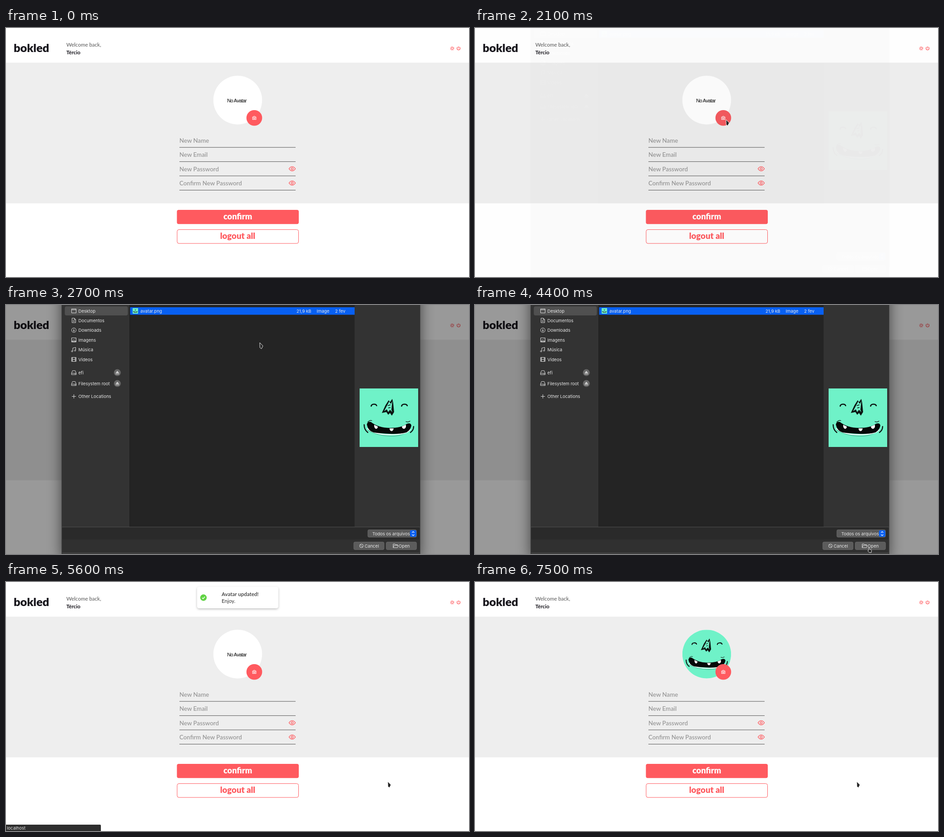
Animation, 1020 px wide and 549 px high, one loop 8000 ms. Source, as an HTML page:

```html
<!DOCTYPE html>
<html lang="en">
<head>
<meta charset="utf-8">
<title>Profile avatar update</title>
<style>
  html, body { margin: 0; width: 100%; height: 100%; overflow: hidden; background: #fff; }
  svg { display: block; width: 100%; height: 100%; }
  .lato { font-family: Lato, sans-serif; }
  .heavy { font-family: Lato, sans-serif; font-weight: 900; }
  .alt { font-family: "Liberation Sans", Arial, sans-serif; letter-spacing: -.6px; }
  .ui { font-family: Inter, sans-serif; font-size: 9.6px; fill: #e8e8e8; }
  .line { fill: none; stroke: #ff5a5f; stroke-width: 1.3; }
  .glyph { fill: none; stroke: #ddd; stroke-width: 1; }
  .unstyled text { visibility: hidden; }
</style>
</head>
<body>
<svg id="stage" viewBox="0 0 1020 549">
  <defs>
    <clipPath id="round"><circle cx="510.5" cy="159" r="53.7"/></clipPath>
    <filter id="soft" x="-20%" y="-20%" width="140%" height="140%"><feGaussianBlur stdDeviation="15"/></filter>
    <filter id="lift" x="-10%" y="-30%" width="120%" height="180%">
      <feDropShadow dx="0" dy="2" stdDeviation="2.5" flood-opacity=".25"/>
    </filter>
    <g id="eye">
      <path class="line" d="M-7 0Q-3.8-4.7 0-4.7T7 0Q3.8 4.7 0 4.7T-7 0Z"/>
      <circle class="line" r="2.3"/>
    </g>
    <g id="drive" class="glyph"><path d="M-5.2 1.5 -3-4.2H3L5.2 1.5V4.6H-5.2ZM-5.2 1.5H5.2M2 3H3.6"/></g>
    <g id="eject">
      <circle r="7.6" fill="#686868"/>
      <path d="M-4 1 0-3.6 4 1ZM-4 2.2H4V3.4H-4Z" fill="#ddd"/>
    </g>
    <g id="face">
      <rect width="129" height="129" fill="#6ff2c8"/>
      <path d="M18 92Q40 104 66 105T104 95" fill="none" stroke="#54c8a4" stroke-width="2"/>
      <g fill="none" stroke="#0c1512" stroke-linecap="round">
        <path d="M25.5 39C26 34 36 33 37.5 38M92.500 39C93 34 103 33 105 38" stroke-width="2.6"/>
        <path d="M10 80Q10 91 18 97M119 84Q119 92 112 97" stroke-width="2.4"/>
        <path d="M18 74Q23 69 27 71M102 73Q107 75 111 72" stroke-width="1.2"/>
      </g>
      <path d="M49 54 57 37 64 26 67 30 72 23 74 32 76 52 71 60 67 54 63 58 59 52Z" fill="#0c1512"/>
      <path d="M54 50 65 29 69 34 72 28 70 47 72 52 67 47 63 52 60 46Z" fill="#6ff2c8"/>
      <path d="M62 38 68 36M63 43 68 42" stroke="#0c1512" stroke-width="1.4"/>
      <path d="M17 88Q32 102 68 102T112 90" fill="none" stroke="#fff" stroke-width="2"/>
      <path d="M16 79Q18 72 25 74Q42 87 67 87T104 78Q113 75 114 82Q112 92 103 97Q87 101 66 100T31 97Q18 93 16 79Z" fill="#050908"/>
      <path d="M32 80 40 84Q40 89 36 89Q32 88 32 80ZM66 88H75Q74 94 70 94Q66 93 66 88ZM93 84 102 80Q103 88 98 89Q94 89 93 84Z" fill="#fff"/>
    </g>
  </defs>
  <rect width="1020" height="549" fill="#fff"/>
  <g id="page"></g>
  <g id="toast"></g>
  <rect id="dim" width="1020" height="549" opacity="0"/>
  <g id="dialog" opacity="0"></g>
  <g id="status"></g>
  <g id="cursor" fill="#252525" stroke="#fff" stroke-width=".9" stroke-linejoin="round">
    <path id="arrow" d="M0 0 7 7.200 3.800 13.500 .3 11Z"/>
    <path id="hand" d="M0 7V1.300a1.100 1.100 0 0 1 2.200 0V4.800L5.600 5.600Q7 6 6.700 7.600L6 11.800H1.500L-1.700 8.200Q-1.400 6.800 0 7Z"/>
  </g>
</svg>
<script>
const LOOP = 8000, STEP = 100;
const RED = '#ff5a5f';
const $ = id => document.getElementById(id);

const text = (x, y, size, fill, cls, str, extra = '') =>
  `<text x="${x}" y="${y}" font-size="${size}" fill="${fill}" class="${cls}" ${extra}>${str}</text>`;
const label = (x, y, str) => `<text x="${x}" y="${y + 3.5}" class="ui">${str}</text>`;
const box = (x, y, w, h, fill, r = 0, extra = '') =>
  `<rect x="${x}" y="${y}" width="${w}" height="${h}" rx="${r}" fill="${fill}" ${extra}/>`;
const use = (id, x, y, scale = 1) =>
  `<use href="#${id}" transform="translate(${x} ${y}) scale(${scale})"/>`;

function buildPage() {
  const fields = ['New Name', 'New Email', 'New Password', 'Confirm New Password'].map((name, i) => {
    const y = 263.2 + i * 31.43;
    return text(382, y - 10.5, 13.3, '#999', 'lato', name, 'font-weight="600"') +
      box(382, y - .5, 256, 1, '#555') + (i > 1 ? use('eye', 630.5, y - 15.7) : '');
  }).join('');
  const middle = 'text-anchor="middle"';
  $('page').innerHTML =
    text(17, 52.5, 25.3, '#15131a', 'heavy', 'bokled') +
    text(133, 41, 11.5, '#555', 'lato', 'Welcome back,') +
    text(133, 58, 11.5, '#15131a', 'lato', 'Tércio', 'font-weight="700"') +
    `<g class="line" transform="translate(983 45)">
      <circle r="2.2" stroke-width="1"/><circle r="3.6" stroke-width="1.7" stroke-dasharray="1.1 1.727"/></g>
    <path class="line" d="M995 42A3.500 3.500 0 1 0 999 42M997 40.500V45"/>` +
    box(0, 76.5, 1020, 310, '#eee') +
    '<circle cx="510.5" cy="159" r="53.7" fill="#fff"/>' +
    text(508.5, 164, 11, '#000', 'alt', 'No Avatar', middle) +
    `<g id="avatar" clip-path="url(#round)">${use('face', 456.8, 105.3, .833)}</g>
    <circle id="camera" cx="547" cy="198.200" r="17.300"/>
    <g fill="none" stroke="#fff" stroke-width="1.1">
      <path d="M543.300 196.200H545L545.800 194.800H548.200L549 196.200H550.700V201.800H543.300Z"/>
      <circle cx="547" cy="198.800" r="1.600"/></g>` +
    fields +
    box(376.5, 401, 268.5, 31.3, RED, 4) +
    box(377, 444.5, 267.5, 30.5, '#fff', 4, `stroke="${RED}"`) +
    text(510.5, 421.5, 18.2, '#fff', 'heavy', 'confirm', middle) +
    text(510.5, 464.5, 18.6, RED, 'heavy', 'logout all', middle);
}

function buildToast() {
  $('toast').innerHTML = box(421, 10.5, 179, 47.5, '#fff', 5, 'filter="url(#lift)"') +
    `<g id="tick"><circle r="7.200" fill="#61d345"/>
      <path d="M-3 .3-.8 2.400 3.200-2" fill="none" stroke="#fff" stroke-width="1.500"/></g>` +
    text(475, 31, 11.6, '#363636', 'lato', 'Avatar updated!', 'font-weight="600"') +
    text(475, 46, 11.5, '#363636', 'lato', 'Enjoy.');
}

function buildDialog() {
  const places = [
    ['Desktop', 13, 'M-5-4.500H5V4.500H-5ZM-5-2.500H5'],
    ['Documentos', 34, 'M-4-5H1L4-2V5H-4ZM1-5V-2H4M-2 0H2M-2 2.500H2'],
    ['Downloads', 55.5, 'M-5 0A5 5 0 1 0 5 0A5 5 0 1 0-5 0M0-3V2.500M-2.200.5 0 2.700 2.200.5'],
    ['Imagens', 77, 'M-5-4.500H5V4.500H-5ZM-4 3.500-1.500-.5.5 1.500 2 0 4 3.500ZM2-2.500H3'],
    ['Música', 98.5, 'M-2.500 3.500V-3.500L4-5V2M-2.500 3.500A1.500 1.300 0 1 1-2.600 3M4 2A1.500 1.300 0 1 1 3.900 1.500'],
    ['Vídeos', 120, 'M-5-4.500H5V4.500H-5ZM-3-4.500V4.500M3-4.500V4.500M-3 0H3M-5-1.500H-3M-5 1.500H-3M3-1.500H5M3 1.500H5'],
    ['Other Locations', 201.5, 'M-4.500 0H4.500M0-4.500V4.500']
  ].map(([name, y, d]) => label(159.5, y, name) +
    `<path class="glyph" transform="translate(149.500 ${y})" d="${d}"/>`).join('');
  const disks = [['efi', 149], ['Filesystem root', 173]].map(([name, y]) =>
    label(159.5, y, name) + use('drive', 149.5, y) + use('eject', 245.3, y)).join('');
  const edge = 'stroke="#777" stroke-width=".6"';
  $('dialog').innerHTML =
    box(122, -60, 791, 620, '#000', 0, 'opacity=".55" filter="url(#soft)"') +
    box(122.5, -10, 790, 559, '#333') +
    box(272.5, -10, 495.5, 500, '#242424') +
    box(272, -10, 1, 500, '#1c1c1c') +
    box(123, 489, 789, 1, '#505050') +
    box(124, 490, 787, 27, '#2a2a2a') +
    box(124, 517, 787, 30, '#303030') +
    box(124, 546.5, 787, 1, '#5a5a5a') +
    box(129.5, 3, 139, 20, '#505050', 4) +
    places + disks +
    box(273.5, 5, 494.5, 16.5, '#0860f2') +
    use('face', 279, 7, .093) +
    label(296, 13.5, 'avatar.png') + label(640, 13.5, '21,9 kB') +
    label(684.5, 13.5, 'Image') + label(725, 13.5, '2 fev') +
    use('face', 779, 184) +
    box(797, 495.5, 107.5, 16.5, '#5a5a5a', 3, edge) + label(807, 504, 'Todos os arquivos') +
    box(890, 496.5, 14, 14.5, '#0860f2', 3) +
    '<path d="M894.500 502 897 499.500 899.500 502M894.500 506 897 508.500 899.500 506" fill="none" stroke="#fff" stroke-width="1.200"/>' +
    box(766, 522.5, 67, 17, '#5c5c5c', 3, edge) + label(790, 531, 'Cancel') +
    '<path class="glyph" d="M779 531A4 4 0 1 1 787 531A4 4 0 1 1 779 531M780.200 528 785.800 534"/>' +
    box(837.5, 522.5, 67, 17, '#5c5c5c', 3, edge + ' id="open"') + label(865, 531, 'Open') +
    '<path class="glyph" d="M853 535V527H857L858 528.500H862.500V530M853 535 855 530H864L862.500 535Z"/>';
}

function buildStatus() {
  $('status').innerHTML = box(-3, 535, 212, 17, '#2e2e2e', 2) +
    '<text id="message" x="2" y="546" class="ui"></text>';
}

// Linear interpolation through rows of [time, ...values].
function track(rows, t) {
  if (t <= rows[0][0]) return rows[0].slice(1);
  const i = rows.findIndex(row => row[0] > t);
  if (i < 0) return rows[rows.length - 1].slice(1);
  const a = rows[i - 1], b = rows[i];
  const k = (t - a[0]) / (b[0] - a[0]);
  return a.slice(1).map((v, j) => v + (b[j + 1] - v) * k);
}

const clamp = v => Math.max(0, Math.min(1, v));

// cubic-bezier(.21, 1.02, .73, 1)
function enterEase(x) {
  let lo = 0, hi = 1;
  const curve = (u, p, q) => 3 * u * (1 - u) ** 2 * p + 3 * u * u * (1 - u) * q + u ** 3;
  for (let i = 0; i < 20; i++) {
    const mid = (lo + hi) / 2;
    if (curve(mid, .21, .73) < x) lo = mid; else hi = mid;
  }
  return curve(lo, 1.02, 1);
}

const path = [
  [300, 707, 0], [600, 668, 78], [900, 612, 172], [1100, 591, 200],
  [1300, 563, 203], [1500, 553, 202], [2500, 553, 202], [2600, 556, 125],
  [2700, 559, 83], [2900, 580, 112], [3100, 642, 220], [3400, 736, 363],
  [3700, 822, 462], [4000, 883, 529], [4200, 869, 534], [4400, 867, 534],
  [4900, 867, 534], [5100, 852, 490], [5300, 841, 440]
];
const fade = [
  [2000, 0], [2100, .01], [2200, .3], [2300, .75], [2400, 1],
  [4500, 1], [4600, .85], [4700, .5], [4800, 0]
];

function render(now) {
  const t = Math.floor((now % LOOP) / STEP) * STEP;
  const within = (a, b) => t >= a && t < b;
  const show = (id, on) => $(id).setAttribute('visibility', on ? 'visible' : 'hidden');

  $('page').style.display = within(5700, 6300) ? 'none' : '';
  $('page').classList.toggle('unstyled', within(6300, 6500));
  $('avatar').style.display = t >= 7500 ? '' : 'none';
  $('camera').setAttribute('fill', within(1300, 4700) ? '#f5595e' : RED);

  const [alpha] = track(fade, t);
  $('dim').setAttribute('opacity', alpha * .4);
  $('dialog').setAttribute('opacity', alpha);
  $('open').setAttribute('fill', t >= 4600 ? '#56699a' : '#5c5c5c');

  const k = enterEase(clamp((t - 4645) / 350));
  const tick = clamp((t - 4750) / 300);
  $('toast').style.display = within(4600, 5700) ? '' : 'none';
  $('toast').setAttribute('opacity', .5 + k / 2);
  $('toast').setAttribute('transform',
    `translate(510.5 ${34.25 - 95 * (1 - k)}) scale(${.6 + .4 * k}) translate(-510.5 -34.25)`);
  $('tick').setAttribute('transform', `translate(435 34.5) scale(${tick})`);

  $('status').style.display = within(5600, 6300) ? '' : 'none';
  $('message').textContent = t < 5900 ? 'localhost' : 'Transferring data from localhost…';

  const [x, y] = track(path, t);
  const pointing = within(4400, 4800);
  $('cursor').setAttribute('transform', `translate(${x} ${y})`);
  show('arrow', t >= 300 && !pointing);
  show('hand', pointing);
}

buildPage();
buildToast();
buildDialog();
buildStatus();

const start = performance.now();
function tickFrame() {
  render(performance.now() - start);
  requestAnimationFrame(tickFrame);
}
tickFrame();
</script>
</body>
</html>
```
